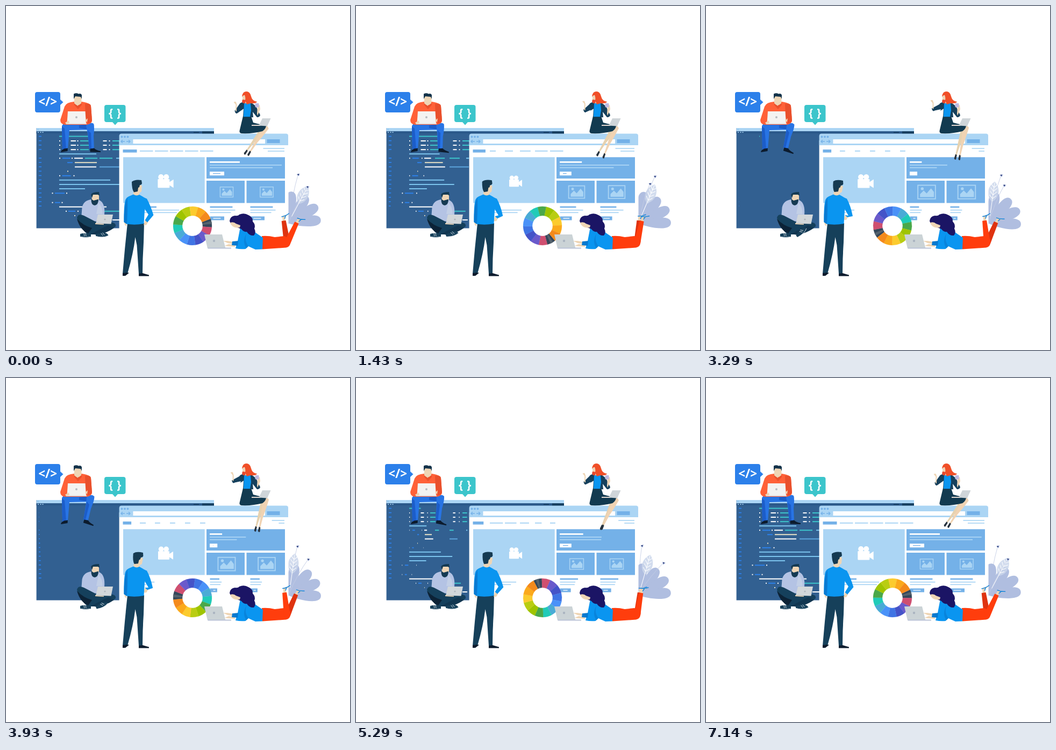
Recreate the animation shown at these times as an HTML page. Size 640 px wide and 640 px high, loop 7210 ms.

```html
<!DOCTYPE html>
<html lang="en">
<head>
<meta charset="utf-8">
<title>Web team</title>
<style>
html, body { margin: 0; width: 100%; height: 100%; overflow: hidden; background: #fff; }
svg { display: block; width: 100%; height: 100%; }
text { font-family: "Open Sans", "Noto Sans", sans-serif; font-weight: 700; fill: #fff; text-anchor: middle; }
</style>
</head>
<body>
<svg id="stage" viewBox="0 0 640 640"></svg>
<script>
const LOOP = 7210, STEPS = 101;
const PALE = '#abd5f4', MID = '#74b1e8', NAVY = '#15405c', INK = '#0c1b2d', SKIN = '#eed5b5',
      TEAL = '#3cc5cb', BLUE = '#2c80ea', SKY = '#7cc4ee', WHITE = '#fff', CREAM = '#ebe4c6',
      SHIRT = '#0a95f0', RED = '#ff3d0d';

// ---- timing -------------------------------------------------------------
const clamp = v => Math.max(0, Math.min(1, v));
const mix = (a, b, p) => a + (b - a) * p;
const smooth = p => (p = clamp(p), p * p * (3 - 2 * p));
const cubic = u => u < .5 ? 4 * u ** 3 : 1 - 4 * (1 - u) ** 3;
// 0 at the loop's ends, 1 in its middle; delay shifts it
const swing = (t, delay = 0) => {
  const u = (((t - delay) % LOOP) + LOOP) % LOOP / LOOP;
  return cubic(1 - Math.abs(1 - 2 * u));
};
const wave = (t, period, peak) => Math.cos(2 * Math.PI * (t - peak) / period);
// rises to 1 from time `out`, falls back to 0 from time `back`
const hold = (t, out, back, d) => smooth((t - out) / d) - smooth((t - back) / d);

// ---- drawing helpers ----------------------------------------------------
const path = (d, fill, extra = '') => `<path d="${d}" fill="${fill}" ${extra}/>`;
const line = (d, stroke, w = 1) =>
  `<path d="${d}" fill="none" stroke="${stroke}" stroke-width="${w}" stroke-linecap="round"/>`;
const rect = (x, y, w, h, fill, r = 0) =>
  `<rect x="${x}" y="${y}" width="${w}" height="${h}" rx="${r}" fill="${fill}"/>`;
const dot = (x, y, r, fill) => `<circle cx="${x}" cy="${y}" r="${r}" fill="${fill}"/>`;
const group = (id, body) => `<g id="${id}">${body}</g>`;

// bars whose width breathes
const bars = [];
function bar(x, y, w, h, fill, curve, min = 0, right = false) {
  bars.push({ x, w, curve, min, right });
  return `<rect class="bar" x="${x}" y="${y - h / 2}" width="${w}" height="${h}" fill="${fill}"/>`;
}
const by = delay => t => swing(t, delay);

// ---- code window --------------------------------------------------------
function codeWindow() {
  let s = rect(56.6, 227, 330.4, 186.5, '#326091') + rect(56.6, 227, 330.4, 6, PALE) +
    rect(56.6, 233, 330.4, 4.5, '#2b598a') + rect(365, 233, 22, 5, '#173f60') + rect(349, 234.5, 10, 1.5, '#173f60') +
    [60, 64.5, 68.5].map(x => dot(x, 235, 1.1, PALE)).join('') + dot(59.5, 229.5, .8, MID);
  for (let i = 0; i < 17; i++) {
    if (i === 4) continue;
    s += bar(61, 242.5 + i * 8.1, 5, 1.8, BLUE, t => hold(t, 1700 - 40 * i, 3800 - 45 * i, 1000));
  }
  // late: how much later than the others a row closes and opens again
  const row = (y, late, ...parts) => {
    const curve = t => hold(t, 700 + late[0], 4150 + late[1], 1950);
    for (const [x, w, c] of parts) s += bar(x, y, w, 2, c, curve);
  };
  row(242.5, [800, 300], [99, 55, TEAL]);
  for (const y of [251, 259, 267.2])
    row(y, [600, 0], [99, 2, WHITE], [120.5, 9.5, WHITE], [132.5, 2, WHITE], [138, 16, TEAL],
      [180.5, 7, WHITE], [191.5, 2, WHITE], [198, 14, TEAL]);
  row(275.2, [200, 200], [99, 69, SKY]);
  row(283.2, [150, 400], [99, 2, WHITE], [105, 15, BLUE], [122, 2, WHITE], [127, 16, WHITE], [147, 23, TEAL],
    [174, 24, TEAL], [205, 7, SKY]);
  row(291.3, [200, 400], [114, 10, BLUE], [128, 41, CREAM]);
  row(299.4, [450, 300], [128, 40, WHITE], [174, 38, '#5da5dd']);
  row(307.5, [0, 200], [114, 2, CREAM]);
  row(315.8, [0, 600], [99, 2, WHITE], [104.5, 16, BLUE], [125.5, 2, WHITE]);
  row(323.8, [0, 0], [99, 95, SKY]);
  row(332, [0, -50], [99, 122, SKY]);
  row(340, [0, -50], [99, 48, SKY]);
  row(348.3, [300, 350], [85.5, 2, WHITE], [91, 18, BLUE], [112, 2, WHITE]);
  row(365.7, [200, 350], [85.5, 2, WHITE], [91, 10, BLUE], [103.5, 2, WHITE]);
  row(373.7, [200, -100], [99, 88, WHITE]);
  row(381.8, [100, 200], [111, 2, WHITE], [116, 13, BLUE], [133, 2, WHITE], [181, 30, TEAL]);
  row(390, [200, 300], [127, 2, CREAM]);
  row(398, [100, -100], [198, 13, WHITE]);
  return s;
}

// ---- browser window -----------------------------------------------------
const picture = (id, x) => group(id,
  `<rect x="${x - 12}" y="336.8" width="24" height="18.6" fill="none" stroke="${PALE}" stroke-width="1.4"/>` +
  path(`M${x - 9} 353v-4l5-5 4 4 6-7 4 5v7Z`, PALE) + dot(x - 6, 341.5, 2, PALE));

function browser() {
  let s = rect(210.6, 250, 314, 170, WHITE) + path('M210.600 259V241.500Q211 237.500 215 237.500H521Q525 237.500 525 241.500V259Z', PALE) +
    [215.5, 221, 226.5].map(x => dot(x, 243.3, 1.9, MID)).join('') +
    line('M214 252h6.500M214 252l2.500-2.500M214 252l2.500 2.500M224.500 252h6.500M231 252l-2.500-2.500M231 252l-2.500 2.500', MID, 1.3) +
    rect(236.5, 248, 245.5, 8, WHITE) + rect(485.5, 248, 24, 7, MID) +
    bar(217.5, 269.8, 26, 5.6, MID, by(0), .6);
  for (let i = 0; i < 5; i++)
    s += bar(249 + 28 * i, 269.8, 24.5, 2, PALE, t => hold(t, 400 * i - 50, 3600 + 400 * i, 1800), .4);
  s += bar(478.5, 265, 39.5, 1.7, PALE, by(0), .59, true) + bar(487, 270, 31, 1.7, PALE, by(0), .34, true) +
    rect(218, 281.3, 151.7, 85.2, PALE) + rect(373, 281.3, 146, 39.7, MID) +
    rect(373, 325, 71, 41.5, MID) + rect(447.5, 325, 71.5, 41.5, MID) +
    bar(379, 290.4, 56, 2.8, WHITE, by(-300), .4) + bar(379, 296, 134.5, 1.8, PALE, by(450), .5) +
    bar(379, 300.8, 117, 1.8, PALE, by(0), .43) +
    bar(379, 311.7, 27, 7, WHITE, by(-250), .52) + bar(385, 311.7, 14, 1.3, MID, by(-400)) +
    picture('pic0', 410.5) + picture('pic1', 485) +
    group('camera', dot(289.3, 319, 4.5, WHITE) + dot(298, 319, 4.5, WHITE) +
      rect(284, 322.5, 19.5, 14.5, WHITE, 1) + path('M303 327.500L310 323V337L303 332.500Z', WHITE));
  for (const x of [379.5, 454.5])
    s += bar(x, 374, 42, 2.6, MID, by(-350), .4) + bar(x, 379.7, 47, 1.8, PALE, by(200), .46) +
      bar(x, 384.3, 39, 1.8, PALE, by(0), .5) + bar(x, 395, 26.5, 7, MID, by(-150), .5) +
      bar(x + 6, 395, 14, 1.3, WHITE, by(0), .3);
  return s + bar(230, 374, 50, 2.6, MID, by(-300), .4) + bar(230, 379.7, 92, 1.8, PALE, by(-100), .5) +
    bar(230, 384.3, 88, 1.8, PALE, by(-100), .35);
}

// ---- colour wheel -------------------------------------------------------
function wheel() {
  const tones = ['#34475a', '#cf4f70', '#6a5acb', '#4453c8', '#3f74e4', '#4a92f8', '#4aabd6', '#20cbb8',
    '#4aa84a', '#9fc400', '#b9cd12', '#fccb2e', '#fba91c', '#f48a1c'];
  const step = 2 * Math.PI / tones.length;
  const at = (r, a) => `${(347 + r * Math.cos(a)).toFixed(2)} ${(409 + r * Math.sin(a)).toFixed(2)}`;
  return group('wheel', tones.map((c, i) => {
    const a = -.15 + (i - .5) * step, b = a + step;
    return path(`M${at(36, a)}A36 36 0 0 1 ${at(36, b)}L${at(19, b)}A19 19 0 0 0 ${at(19, a)}Z`, c,
      `stroke="${c}" stroke-width=".3"`);
  }).join('') + path(`M${at(36, -.25)}A36 36 0 0 1 ${at(36, -.1)}L${at(19, -.1)}L${at(19, -.25)}Z`, '#55636e'));
}

// ---- people -------------------------------------------------------------
function sitter() {
  return path('M104 223Q106 217 120 217H152L163 219Q165 228 158 230L118 231L115 267H105Z', '#2874e4') +
    path('M109 228L112 266H105L104 224Z', '#1c5dc9') + path('M136 222L160 219Q162 230 152 230L136 227Z', '#1c5dc9') +
    path('M102 271Q104 267 108 265.500L115 264.500L114.500 270L102.500 272Z', INK) +
    group('kick', path('M149 222Q156 215 163 219Q165 226 163 242L164 266H155L152 238Z', '#2874e4') +
      path('M152 232L155 266H159L158 236Z', '#1c5dc9') +
      path('M156.500 271.500V265.500L164 264.500Q167 268 176 270V272Z', INK)) +
    path('M127 178Q112 179 109 187L101 212Q101 220 110 221H150Q160 219 160 213L158 186Q156 180 140 178Z', '#ff6138') +
    path('M147 182Q157 180 158 186L160 213Q159 218 152 219L148 208Z', '#e9502c') +
    path('M127 168H140.500V178Q139 186 133.500 186Q128 185 127 178Z', SKIN) +
    path('M127 178.500L133 186L140 178.500L141 184L134 192L127 184Z', '#e9502c') +
    path('M127 181Q133 188 140 181V178H127Z', SKIN) +
    path('M126 173V163.500Q131 161 135 163.500Q139 162 141 165.500L140.800 173L139 169L129 168Z', '#12324a') +
    path('M115 196H147.500L149 219H113.500Z', '#f4f3f1') + dot(131, 207, 2, '#b7bcc0') +
    path('M110 217L117 213L118 218L112 220Z', SKIN) + path('M147 213L152 209L151 216Z', SKIN) +
    path('M112 218.500H150V220H112Z', '#dcdcdc');
}

const leg = (id, skin) => group(id, path('M-5 -3Q0 -6 6 -1Q4.500 17 2 31L.6 54H-1.600L-3.200 28Z', skin) +
  path('M-2 52L1 53L1.600 61Q-.5 63.500 -2.200 60Z', '#26323e'));

function woman() {
  return leg('legA', '#e6d2b0') + leg('legB', '#f0d3b3') +
    path('M441 205H456L460 217L484 223Q483 229 477 233Q458 238 438 237Q433 236 435 230Z', '#123a50') +
    path('M457 221H474L473 223H457Z', '#e3d9d2') + path('M477 209H492.500L486 223.500L470.500 222.500Z', '#cfd5d9') +
    path('M441 179Q449 176 458 181Q466 186 468 193L473 203Q472 207 467 207L459 197L460 207H441L442 191L436 195Z', NAVY) +
    path('M443 181H455L456 194L454 206H442Z', SHIRT) +
    `<path id="sleeve" fill="${NAVY}"/><path id="arm" fill="none" stroke="${SKIN}" stroke-width="2" stroke-linecap="round"/>` +
    path('M468 204L473 192L472 184L468 186L467 200Z', SKIN) + rect(463.5, 181, 7, 7.5, '#bdb9e2', 1) +
    path('M440 167H448L449 181L444 181Q439 179 440 167Z', SKIN) +
    path('M439 169Q440 159 447 159Q454 159 456 168Q458 177 467 178Q465 182 455 181L448 183L445 176Q446 170 444 166Q441 166 439 169Z', '#f04f28') +
    path('M440 174L446 175L445 181Q441 182 439 178Z', '#e8472a');
}

function stander() {
  return path('M226 404H257L256 440Q254 470 254 498H247L243.500 445L240.500 430Q237 460 226 498H217Q221 450 226 404Z', '#16405a') +
    path('M217 497L225 496L229 496.500L222 502H217Z', INK) + path('M247 498L254 497L266 500.500V502.500H247Z', INK) +
    path('M220 402H224.500L224 410L221 407Z', SKIN) +
    group('head', path('M240 342L249 333L253 334L252 345L248 348V353H237V345Z', SKIN) +
      path('M234 327Q240 322 252 324L253 330Q252 333 249 333L248 337L246 338L245 345L238 346.500Q234 341 234 327Z', '#153a52')) +
    `<path id="hip" fill="${SKIN}"/><path id="elbow" fill="${SHIRT}"/>` +
    path('M229 354L237 350.500Q243 354 248 351L262 359L258 380L256.500 405Q240 408 224 405.500L219.500 402Q219 371 222 361Q224 356 229 354Z', SHIRT) +
    path('M226 356Q219 372 219.500 402L225 405.500L226 380Z', '#0a7bd2');
}

function coder() {
  return path('M158 360Q144 362 141.500 375L140 396L158 402L176 399L183 388Q185 366 173 361Z', '#b4c3e4') +
    path('M172 366Q180 375 180 387H168Z', '#c2cfe6') +
    path('M159 350H173V361L160 363Z', SKIN) +
    path('M158 351Q160 346 173 346L174 353L171 351H162L160 357Z', '#153a52') +
    path('M158.500 359L163 362L172 359.500Q172 370 165 371Q158 370 158.500 359Z', '#153a52') +
    path('M132 394Q134 385 145 390L172 404L196 402.500Q205 403 204 410Q190 421 172 425H152Q138 414 132 394Z', NAVY) +
    path('M132 396Q144 409 160 413L153 423Q138 417 132 396Z', '#0c2236') +
    path('M158 424L190 408L201 413Q186 423 170 426Z', '#123650') +
    path('M171 388H199L195.500 405.500L167 404.500Z', '#d2d7da') + dot(184, 397, 1.6, '#aeb6bd') +
    path('M166 404L182 405.500V407L166 406Z', SKIN) +
    path('M138 424Q148 421 158 425V429.500Q147 432 138 429Z', '#17405a') +
    line('M139 429.500Q148 431.500 157 429.500M145 423.500L146 428M148 423.500L149 428', '#dfe6ee', .9) +
    group('shoe', path('M167 424L180 421Q189 422 190.500 427Q180 432 167 428Z', '#17405a') +
      line('M169 429Q181 432 190 427.500M177 423L180 427M180 422L183 426', '#dfe6ee', .9));
}

const shin = (id, fill) => group(id, path('M-2.500 -40L2.500 -40L2.500 -48L11 -53L-2 -51Z', SKIN) +
  line('M-3 -50Q4 -50 11 -54M2 -46L4 -50', '#1585de', 1.5) +
  path('M-6 -1L-4.500 -42H3.500L6 -2Q4 8 -3 8Z', fill));

function reader() {
  return path('M369 425H402L408.500 451H375Z', '#cbd3d6') + dot(387, 437, 2.2, '#aab4c0') +
    path('M375 449.500H419V451.500H376Z', '#bcc4d8') +
    shin('shinB', '#df3310') +
    path('M476 428Q488 427 500 430L518 428L529 434Q531 448 521 449.500L477 452.500Z', RED) + shin('shinA', RED) +
    path('M404 437L412 437L425 439V443L412 441Z M407 446L414 443L426 444V448L412 447Z', SKIN) +
    path('M436 411Q444 406 453 414L478 431L477 452.500L464 453Q455 449 449 446L446 452Q436 453 427 451L431 437Z', SHIRT) +
    path('M421 438L432 437L431 446L420 445Z', '#0879cf') + path('M447 424Q443 436 451 447L447 451Q439 438 447 424Z', '#0a84db') +
    path('M416 400Q417 391 426 390Q432 391 434 388Q443 384 451 389Q460 393 459 401Q465 407 462 414Q466 422 461 427Q453 428 448 420Q442 421 438 415L428 411Q418 408 416 400Z', '#1b1565') +
    path('M417 403Q424 401 428 405L436 408L435 412L430 412.500Q420 412 417 403Z', SKIN);
}

// ---- plant --------------------------------------------------------------
const bloom = (id, len) => group(id, line(`M0 0Q-4 ${-len * .55} 0 ${-len}`, '#c3cce4', .8) +
  path(`M-3 ${-len}L3 ${-len - 2.5}L2 ${-len + 3}Z`, '#a3b4dd') + dot(.3, -len, 1.3, '#2d3a72'));

function plant() {
  const petal = (a, len) => path(`M0 1C-8 -15 -18 ${-len} 0 ${-len}C18 ${-len} 8 -15 0 1Z`, '#b0bee0',
    `transform="rotate(${a})"`);
  const vein = y => `M0 ${y}L-6 ${y - 6}M0 ${y}L6 ${y - 6}`;
  return '<clipPath id="edge"><path d="M525.500 280H620V430H525.500Z"/></clipPath><g clip-path="url(#edge)">' +
    bloom('bloomA', 88) +
    group('petals', petal(5, 59) + petal(34, 61) + petal(59, 63) + petal(84, 60)) +
    group('leaf', path('M0 -36C-14 -46 -12 -64 0 -74C12 -64 14 -46 0 -36Z', '#cbd6ec', 'fill-opacity=".85"') +
      line('M0 -10V-72' + [-42, -49, -56, -63].map(vein).join(''), WHITE, 1)) +
    bloom('bloomB', 72) + '</g>';
}

function bubbles() {
  return path('M58 160H97Q101 160 101 164V174L106.500 179L101 184V194Q101 198 97 198H58Q54 198 54 194V164Q54 160 58 160Z', BLUE) +
    '<text x="77.700" y="185.500" font-size="22.500">&lt;/&gt;</text>' +
    path('M187 184H218.500Q222.500 184 222.500 188V212Q222.500 216 218.500 216H208L203 221.500L198 216H187Q183 216 183 212V188Q183 184 187 184Z', TEAL) +
    '<text x="195" y="205.500" font-size="20.500">{</text>' +
    '<text x="210.300" y="205.500" font-size="20.500">}</text>';
}

const stage = document.getElementById('stage');
stage.innerHTML = codeWindow() + browser() + bubbles() + plant() + sitter() + woman() + coder() +
  wheel() + stander() + reader();
const barEls = stage.querySelectorAll('.bar');
const el = {};
stage.querySelectorAll('[id]').forEach(n => el[n.id] = n);

const place = (id, v) => el[id].setAttribute('transform', v);
const turn = (id, a, x, y) => place(id, `rotate(${a} ${x} ${y})`);
const hinge = (id, x, y, a) => place(id, `translate(${x} ${y}) rotate(${a})`);
const zoom = (id, k, x, y) => place(id, `translate(${x} ${y}) scale(${k}) translate(${-x} ${-y})`);

function draw(t) {
  bars.forEach((b, i) => {
    const w = b.w * mix(1, b.min, b.curve(t));
    barEls[i].setAttribute('width', Math.max(0, w));
    if (b.right) barEls[i].setAttribute('x', b.x + b.w - w);
  });
  const a = swing(t);
  turn('wheel', 360 * t / LOOP, 347, 409);
  zoom('camera', 1.03 + .11 * wave(t, LOOP / 2, 3290), 297, 326);
  zoom('pic0', mix(1, 1.36, swing(t, -600)), 410.5, 346);
  zoom('pic1', mix(1, 1.36, swing(t, -800)), 485, 346);

  turn('kick', 16 * a, 158, 225);
  hinge('legA', 480, 226, mix(36, 15.5, a));
  hinge('legB', 483, 226, mix(32, 11, swing(t, -350)));
  const r = swing(t, -300), ex = mix(428, 422.5, r), ey = mix(198, 193.5, r);
  const hx = mix(427, 421, r), hy = mix(179, 176, r);
  el.sleeve.setAttribute('d', `M442 179Q436 179 434 183L${ex - 2.5} ${ey - 3}Q${ex - 1} ${ey + 4} ${ex + 3} ${ey + 1}L442 191Z`);
  el.arm.setAttribute('d', `M${ex} ${ey - 3}L${hx + 1.5} ${hy + 5}L${hx} ${hy}M${hx + 1.5} ${hy + 4}L${hx - 2} ${hy}`);

  turn('head', 6 * a, 243, 353);
  const h = swing(t, -800), y = mix(403, 393, h), x = mix(274.5, 273, h), e = mix(389, 391, h);
  el.elbow.setAttribute('d', `M254 356L262 358.500Q269 371 ${x} ${e}L263 ${y}L258.500 ${y - 4}L265 ${e - 1}L257 376Z`);
  el.hip.setAttribute('d', `M259 ${y - 5}L264 ${y}L261 ${y + 5}L256 ${y + 5}Z`);
  turn('shoe', -42 * hold(t, 900, 3300, 1400), 171, 425);

  const c = hold(t, 450, 4150, 2200);
  hinge('shinA', 523, 441, mix(26, -6, c));
  hinge('shinB', 523, 441, mix(-8, 24, c));

  const s = wave(t, LOOP, 1900);
  hinge('bloomA', 527, 400, 11.5 + 8.5 * s);
  hinge('bloomB', 527, 400, 27 - 12 * s);
  hinge('petals', 526, 404, 8 * swing(t, -600));
  hinge('leaf', 527, 400, mix(28, 8, a));
}

let start;
function tick(now) {
  if (start === undefined) start = now;
  const step = Math.floor(((now - start) % LOOP) / LOOP * STEPS);
  draw(step * LOOP / STEPS);
  requestAnimationFrame(tick);
}
draw(0);
requestAnimationFrame(tick);
</script>
</body>
</html>
```
